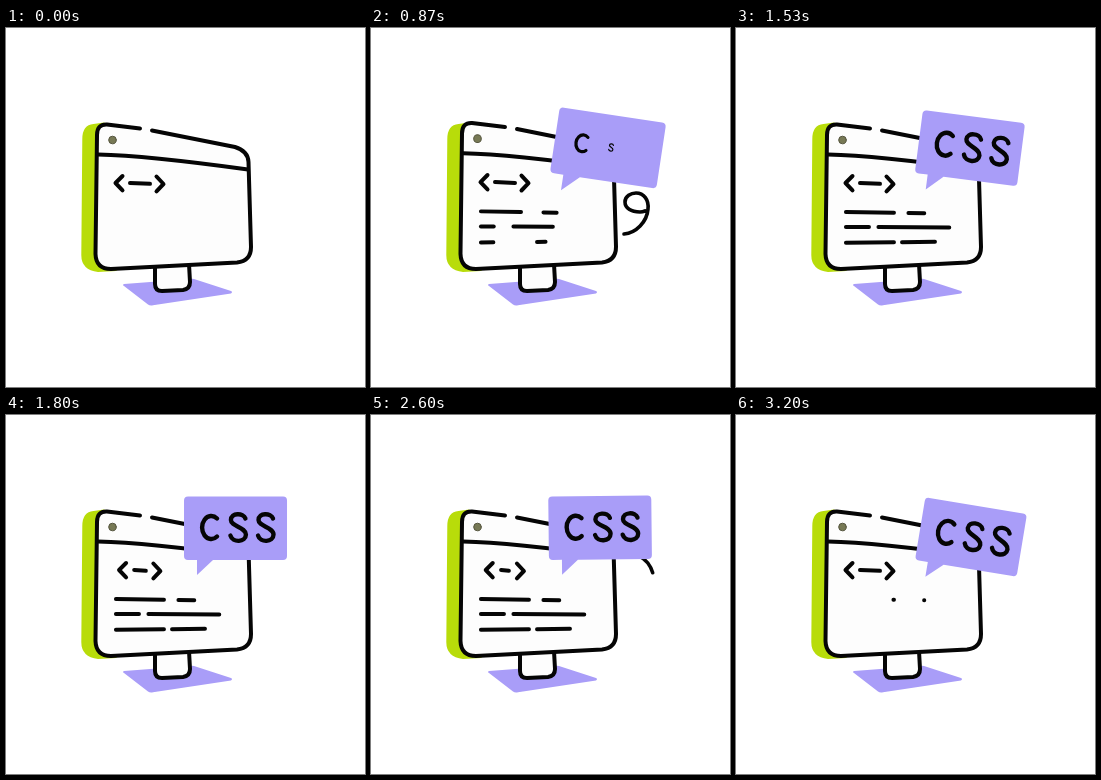
An HTML page with a canvas that plays this animation: 359x359 px, repeating every 3230 ms.

```html
<!DOCTYPE html>
<html lang="en">
<head>
<meta charset="utf-8">
<title>Code window</title>
<style>
html, body { margin: 0; width: 100%; height: 100%; overflow: hidden; background: #fff; }
canvas { display: block; width: 359px; height: 359px; }
</style>
</head>
<body>
<canvas id="stage" role="img" aria-label="Monitor with a CSS speech bubble"></canvas>
<script>
const SIZE = 359, LOOP = 3230;
const INK = '#050505', LIME = '#b8dc0a', LILAC = '#a99df8', PAPER = '#fdfdfd';
const canvas = document.getElementById('stage');
const ctx = canvas.getContext('2d');
const dpr = window.devicePixelRatio || 1;
canvas.width = canvas.height = Math.round(SIZE * dpr);

const clamp = v => Math.max(0, Math.min(1, v));
const span = (t, start, length) => clamp((t - start) / length);
const smooth = p => p * p * (3 - 2 * p);
const bump = (d, half) => Math.abs(d) < half ? 0.5 + 0.5 * Math.cos(Math.PI * d / half) : 0;
const outBack = (p, c) => 1 + (c + 1) * (p - 1) ** 3 + c * (p - 1) ** 2;

const back = new Path2D('M76.3 111Q76.3 97 87.5 96L98 94.5L105 98L222 119.5L222 140L110 243L92 244Q75.3 242 75.3 227Z');
const base = new Path2D('M118 256Q116 257 118 258L142 276.5Q144 278 147 277.3L225 265.5Q227 264 225 263L188 251Q186 250.5 184 251Z');
const stand = new Path2D('M149 236V256Q149 263 156 263L177 262Q184 261 184 254L183 236');
const panel = new Path2D('M101 96.5Q91 96 91 107L89.5 226Q90 241 105 241L231 234.5Q245 233 245 219L242.5 134Q242 123 229 119L146 102L134 100Z');
const panelLine = new Path2D('M134 100.5L101 96.5Q91 96 91 107L89.5 226Q90 241 105 241L231 234.5Q245 233 245 219L242.5 134Q242 123 229 119L146 102.5');
const header = new Path2D('M92 126.5Q140 127.5 242 141.5');
const bubble = new Path2D('M182 81.5H277Q281 81.5 281 85.5V141Q281 145 277 145H207L191 160V145H182Q178 145 178 141V85.5Q178 81.5 182 81.5Z');
const letterC = new Path2D('M7 -9A9.2 11.5 0 1 0 7 9');
const letterS = new Path2D('M7 -9C5 -15 -7.5 -15 -7.5 -7.5C-7.5 -1 7.5 -0.5 7.5 7C7.5 15 -6 15.5 -8 8');

const cableShape = 'M268 141C276 145 283 154 283 167C283 178 276 184 269 184C260 184 254 180 254 174' +
  'C254 168 260 165 265 165C273 165 278 172 277 181C276 194 265 205 253 206';
const cable = new Path2D(cableShape);
const ruler = document.createElementNS('http://www.w3.org/2000/svg', 'path');
ruler.setAttribute('d', cableShape);
const cableLength = ruler.getTotalLength();

// x1, y1, x2, y2, row
const codeLines = [
  [109.9, 184, 158, 184.8, 0], [172.4, 185, 188.3, 185.3, 0],
  [109.9, 199, 133, 199, 1], [142.4, 199, 213.3, 199.5, 1],
  [109.9, 214.7, 158, 214.3, 2], [166, 214.2, 199, 213.7, 2]
];

function stroke(path, width) {
  ctx.lineWidth = width;
  ctx.stroke(path);
}

function polyline(width, ...points) {
  ctx.beginPath();
  for (const [x, y] of points) ctx.lineTo(x, y);
  ctx.lineWidth = width;
  ctx.stroke();
}

function fill(path, color) {
  ctx.fillStyle = color;
  ctx.fill(path);
}

function drawArrow(t) {
  const shut = bump(t % 780 - 380, 220);
  const left = 109.5 + 12 * shut, right = 157.5 - 10.5 * shut;
  polyline(4, [left + 7, 148], [left, 155], [left + 7, 162.3]);
  polyline(4, [right - 7, 148.5], [right, 156], [right - 7, 163.3]);
  const half = 10 - 14 * shut;
  if (half > 0) polyline(4, [134 - half, 155], [134 + half, 155.8]);
}

function drawLines(t) {
  for (const [x1, y1, x2, y2, row] of codeLines) {
    const grown = smooth(span(t, 500 + 102 * row, 500));
    const erased = smooth(span(t, 2790 - 95 * row, 440));
    if (grown <= 0 || erased >= 1) continue;
    const at = p => [x1 + (x2 - x1) * p, y1 + (y2 - y1) * p];
    polyline(3.9, at(erased), at(grown));
  }
}

function drawScreen(t) {
  // dips before the bubble pops, then rebounds slightly
  const stretch = 1 - 0.053 * bump(t - 385, 210) + 0.012 * bump(t - 820, 225);
  ctx.save();
  ctx.translate(0, 241);
  ctx.scale(1, stretch);
  ctx.translate(0, -241);
  fill(panel, PAPER);
  stroke(panelLine, 4);
  stroke(header, 4);
  ctx.beginPath();
  ctx.arc(106.5, 112, 3.8, 0, 2 * Math.PI);
  ctx.fillStyle = '#777955';
  ctx.fill();
  ctx.save();
  ctx.strokeStyle = '#55553f';
  ctx.lineWidth = 1;
  ctx.stroke();
  ctx.restore();
  drawArrow(t);
  drawLines(t);
  ctx.restore();
}

function drawCable(t) {
  if (t < 700) return;
  const phase = (t - 85) % 625;
  const head = span(phase, 0, 110);
  const tail = span(phase, 100, 93) ** 2.6;
  if (head <= tail) return;
  ctx.save();
  ctx.setLineDash([cableLength * (head - tail), 1000]);
  ctx.lineDashOffset = -cableLength * tail;
  stroke(cable, 3.6);
  ctx.restore();
}

function drawBubble(t) {
  const size = outBack(span(t, 580, 400), 1.2);
  if (t <= 580 || size <= 0) return;
  const swing = 10.1 * Math.cos(2 * Math.PI * (t - 820) / 792) - 0.7;
  ctx.save();
  ctx.translate(179, 151);
  ctx.rotate(swing * Math.PI / 180);
  ctx.scale(size, size);
  ctx.translate(-179, -151);
  fill(bubble, LILAC);
  [[204, letterC], [232.4, letterS], [260, letterS]].forEach(([x, letter], i) => {
    const grow = smooth(span(t, 775 + 46 * i, 150));
    if (!grow) return;
    ctx.save();
    ctx.translate(x, 112.5);
    ctx.scale(grow, grow);
    stroke(letter, 4.4);
    ctx.restore();
  });
  ctx.restore();
}

function draw(t) {
  ctx.setTransform(dpr, 0, 0, dpr, 0, 0);
  ctx.fillStyle = '#fff';
  ctx.fillRect(0, 0, SIZE, SIZE);
  ctx.strokeStyle = INK;
  ctx.lineCap = ctx.lineJoin = 'round';
  fill(base, LILAC);
  fill(back, LIME);
  fill(stand, PAPER);
  stroke(stand, 4);
  drawScreen(t);
  drawCable(t);
  drawBubble(t);
}

const begin = performance.now();
function tick() {
  draw((performance.now() - begin) % LOOP);
  requestAnimationFrame(tick);
}
tick();
</script>
</body>
</html>
```
